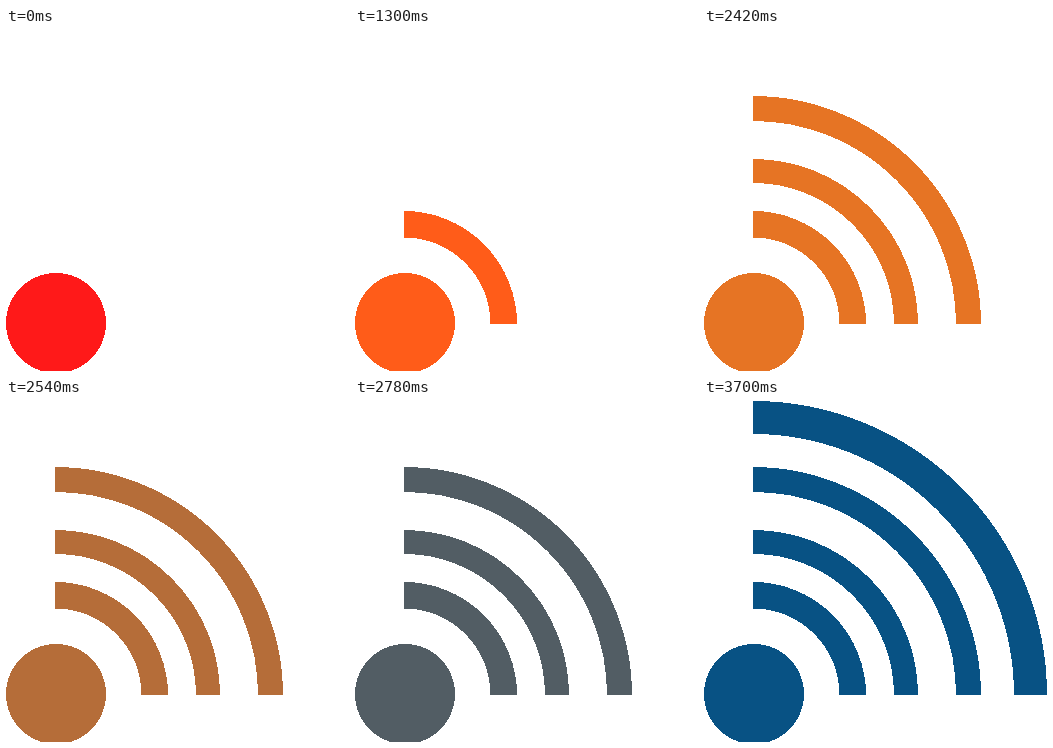
An HTML page for the animation above (3900 ms loop, 343 px wide and 343 px high).

```html
<!DOCTYPE html>
<html lang="en">
<head>
<meta charset="utf-8">
<title>Signal waves</title>
<style>
  :root { --red: #ff1919; --orange: #ff7819; --blue: #085284; }
  html, body { margin: 0; width: 100%; height: 100%; overflow: hidden; background: #fff; }
  svg { display: block; width: 100vw; height: 100vh; shape-rendering: crispEdges; }

  /* The 1 ms lead keeps each step safely on its own side of the boundary. */
  svg * { animation: 3.9s step-end -1ms infinite; }
  .tint { color: var(--red); animation-name: tint; }
  .dot { fill: currentColor; }
  path { fill: none; stroke: currentColor; }

  .a1 { stroke-width: 26.5; animation-name: show1; }
  .a2 { stroke-width: 24; color: var(--orange); animation-name: show2, cool; }
  .a3 { stroke-width: 25; animation-name: show3; }
  .a4 { stroke-width: 33; color: var(--blue); animation-name: show4; }

  /* Red warms to orange, then cools to blue, one step every 60 ms. */
  @keyframes tint {
    0% { color: var(--red); }
    24.1026% { color: #ff2219; }
    27.1795% { color: #ff2c19; animation-timing-function: steps(8, start); }
    39.4872% { color: var(--orange); }
    62.0513% { color: var(--orange); animation-timing-function: steps(10, start); }
    77.4359%, 100% { color: var(--blue); }
  }
  @keyframes cool {
    0% { color: var(--orange); }
    62.0513% { color: var(--orange); animation-timing-function: steps(10, start); }
    77.4359%, 100% { color: var(--blue); }
  }
  @keyframes show1 { 0% { opacity: 0; } 18.9744%, 100% { opacity: 1; } }
  @keyframes show2 { 0% { opacity: 0; } 34.8718%, 100% { opacity: 1; } }
  @keyframes show3 { 0% { opacity: 0; } 56.9231%, 100% { opacity: 1; } }
  @keyframes show4 { 0% { opacity: 0; } 74.359%, 100% { opacity: 1; } }
</style>
</head>
<body>
<svg viewBox="0 0 343 343">
  <g class="tint">
    <circle class="dot" cx="50" cy="295" r="50"/>
    <path class="a1" d="M49 196.25 A99.75 99.75 0 0 1 148.75 296"/>
    <path class="a3" d="M49 80.5 A215.5 215.5 0 0 1 264.5 296"/>
  </g>
  <path class="a2" d="M49 143 A153 153 0 0 1 202 296"/>
  <path class="a4" d="M49 18.5 A277.5 277.5 0 0 1 326.5 296"/>
</svg>
</body>
</html>
```
